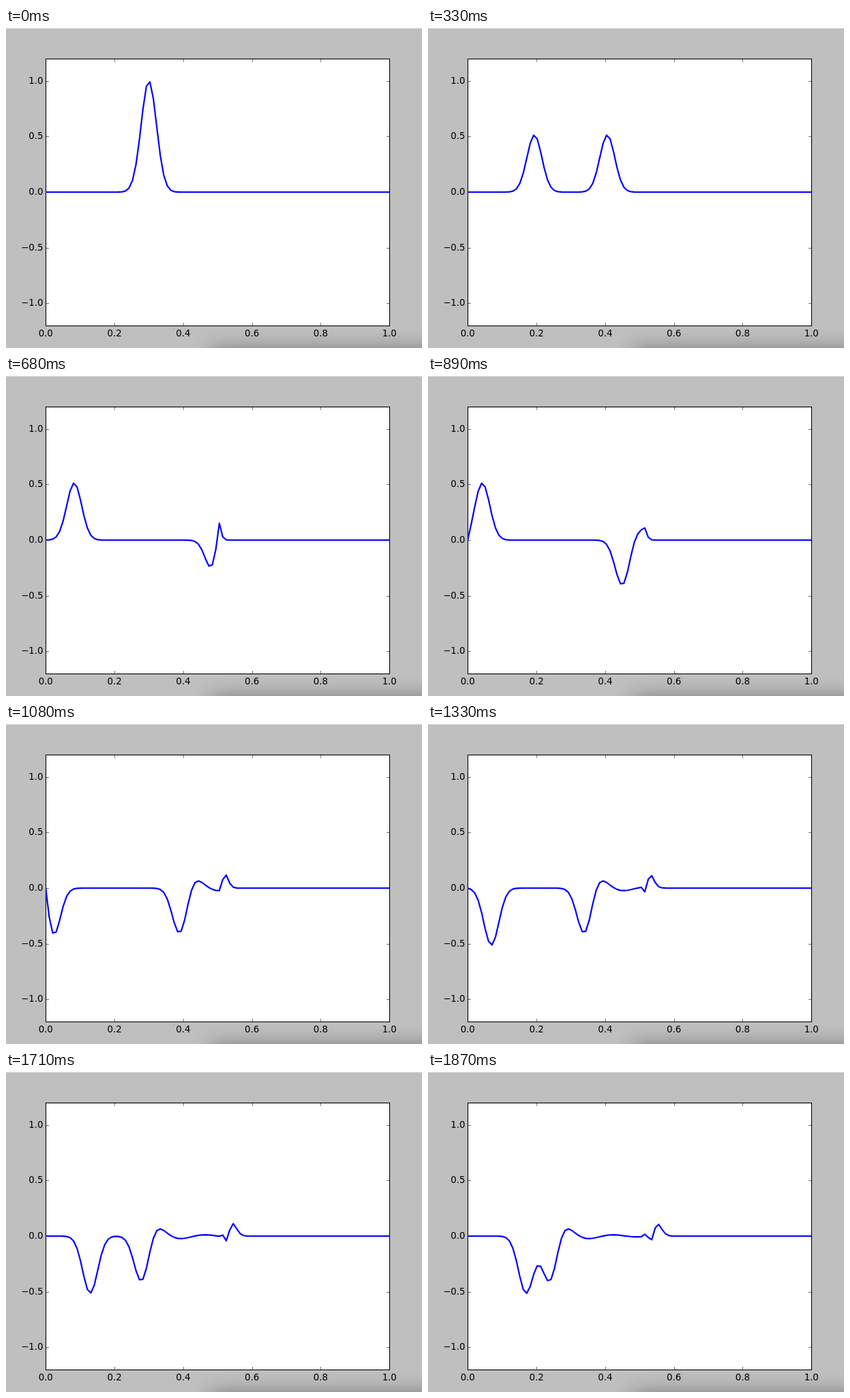
Recreate the animation shown at these times as an HTML page. Size 610 by 470 pixels, loop 9970 ms.

```html
<!DOCTYPE html>
<html lang="en">
<head>
<meta charset="utf-8">
<title>Wave on a string with two densities</title>
<style>
html, body { margin: 0; width: 100%; height: 100%; overflow: hidden; background: #bfbfbf; }
svg { display: block; width: 610px; height: 470px; overflow: hidden; }
text { font: 13.33px "DejaVu Sans", sans-serif; }
#shade { filter: blur(15px); opacity: .36; }
</style>
</head>
<body>
<svg viewBox="0 0 610 470">
  <clipPath id="plot"><rect x="58" y="45" width="504" height="392"/></clipPath>
  <rect width="610" height="1" fill="#dcdcdc"/>
  <rect x="58.5" y="45.5" width="504" height="392" fill="#fff" stroke="#000" stroke-width="1.1"/>
  <path id="ticks" stroke="#000" stroke-width=".56"/>
  <g id="labels"></g>
  <g clip-path="url(#plot)">
    <path id="wave" fill="none" stroke="#00f" stroke-width="2.2" stroke-linejoin="round"/>
  </g>
  <rect id="shade" x="300" y="471" width="400" height="100"/>
</svg>
<script>
const LOOP = 9970, N = 100, SLOW = 0.05;
const el = id => document.getElementById(id);
const px = x => 58.25 + 504 * x;
const py = y => 241 - 163.33 * y;

// Key points of the uneven playback: time (ms), simulation step, picture count
const keys = [
  [0, 0, 0], [330, 10, 5], [680, 21, 11], [1080, 31, 18],
  [1330, 36, 22], [1560, 39, 25], [1870, 46, 30]
];

function stepAt(t) {
  const i = keys.findIndex(([time]) => time > t);
  if (i < 0) return keys.at(-1)[1];
  const [t0, n0, k0] = keys[i - 1], [t1, n1, k1] = keys[i];
  const count = k1 - k0;
  const shown = Math.floor((t - t0) / (t1 - t0) * count);
  return Math.round(n0 + (n1 - n0) * shown / count);
}

// Explicit wave equation, fixed ends, slower medium on the right half
function simulate(steps) {
  let now = Array.from({ length: N }, (_, i) => Math.exp(-1000 * (i / (N - 1) - 0.3) ** 2));
  let old = now;
  const states = [now];
  for (let n = 0; n < steps; n++) {
    const u = now, v = old;
    now = u.map((y, i) => {
      if (i === 0 || i === N - 1) return 0;
      const r = i < N / 2 ? 1 : SLOW;
      return 2 * y - v[i] + r * (u[i - 1] - 2 * y + u[i + 1]);
    });
    old = u;
    states.push(now);
  }
  return states;
}

const paths = simulate(keys.at(-1)[1]).map(u =>
  "M" + u.map((y, i) => px(i / (N - 1)).toFixed(2) + "," + py(y).toFixed(2)).join("L"));

function drawAxes() {
  let ticks = "", labels = "";
  const label = (x, y, anchor, v) => {
    labels += `<text x="${x}" y="${y}" text-anchor="${anchor}">${v.toFixed(1).replace("-", "\u2212")}</text>`;
  };
  for (let i = 0; i <= 5; i++) {
    const x = Math.round(px(i / 5));
    ticks += `M${x + 0.5} 437v-4M${x + 0.5} 46v4`;
    label(px(i / 5), 453, "middle", i / 5);
  }
  for (let i = -2; i <= 2; i++) {
    const y = Math.round(py(i / 2));
    ticks += `M59 ${y + 0.5}h4M562 ${y + 0.5}h-4`;
    label(54.5, y + 4, "end", i / 2);
  }
  el("ticks").setAttribute("d", ticks);
  el("labels").innerHTML = labels;
}

function frame() {
  el("wave").setAttribute("d", paths[stepAt(performance.now() % LOOP)]);
  requestAnimationFrame(frame);
}

drawAxes();
frame();
</script>
</body>
</html>
```
